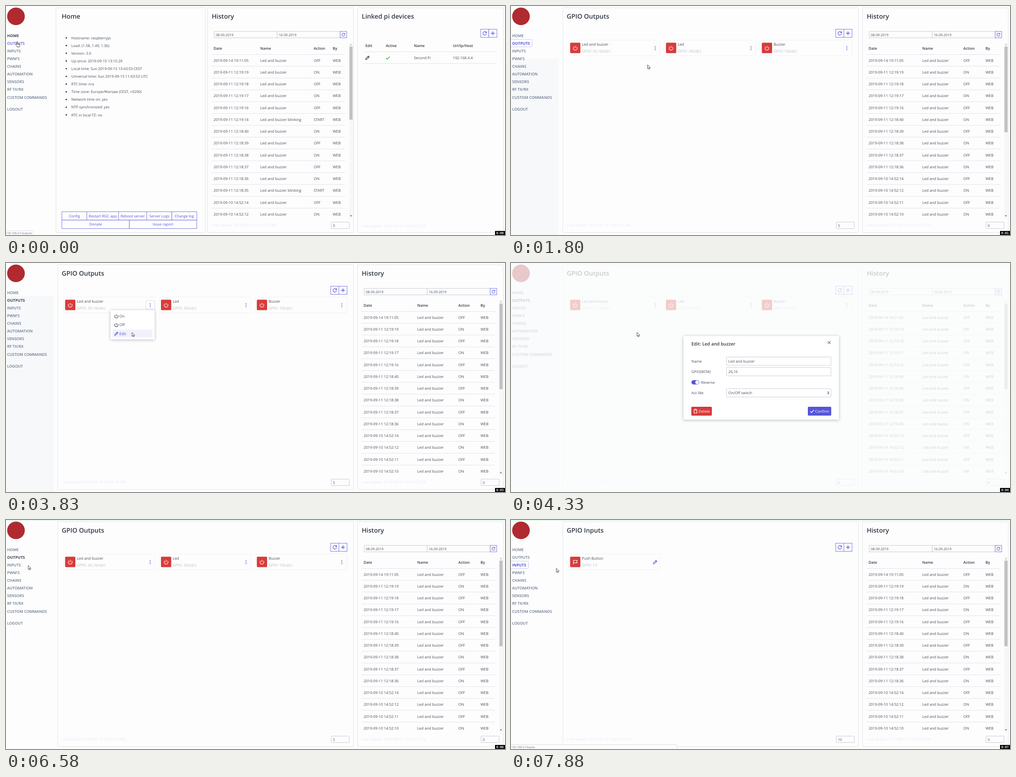
An HTML page for the animation above (8 s loop, 1101x508 px).

```html
<!DOCTYPE html>
<html lang="en">
<head>
<meta charset="utf-8">
<title>GPIO panel</title>
<style>
  html, body { margin: 0; width: 100%; height: 100%; overflow: hidden; background: #fdfdfd; }
  svg { display: block; width: 1101px; height: 508px; font-family: "Open Sans", "Noto Sans", sans-serif; text-rendering: geometricPrecision; }
  text { white-space: pre; }
</style>
</head>
<body>
<svg id="stage" viewBox="0 0 1101 508"></svg>
<script>
const LOOP = 8000;
const INK = '#464d5b', DARK = '#303742', SLATE = '#66758c', BLUE = '#5755d9', RED = '#d93b3b';
const LINE = '#e1e3e9', FIELD = '#c6cbd4', EDGE = '#7977e0', PALE = '#e7e7f8';

// Each step overrides only what changes from the one before it.
const STEPS = [
  { t: 0, page: 'home', active: 0, hover: 1, focus: 0, hand: 1, x: 25, y: 79, sec: 0, link: 'outputs', bar: 61 },
  { t: 770, page: 'outputs', loaded: 0, active: 1, hover: -1, focus: 1, sec: 1, bar: 367, stamp: '10.268', histStamp: '10.314' },
  { t: 1020, loaded: 1 },
  { t: 1520, hand: 0, x: 150, y: 120, bar: 0, side: [118, 508] },
  { t: 1800, x: 301.5, y: 130.5 },
  { t: 1900, x: 315, y: 106, sec: 2 },
  { t: 2150, hand: 1, x: 318, y: 91 },
  { t: 2680, menu: 1, item: -1, focus: 0, side: [73, 508] },
  { t: 3060, hand: 0, x: 285, y: 130, item: 1, sec: 3 },
  { t: 3310, x: 280, y: 151, item: 2 },
  { t: 3560, x: 278, y: 154 },
  { t: 4080, menu: 0, modal: 1, sec: 4, side: [0, 508] },
  { t: 4860, x: 640, y: 200, side: [0, 215] },
  { t: 5130, hand: 1, x: 704, y: 180, sec: 5 },
  { t: 5480, x: 706, y: 177 },
  { t: 5730, modal: 0, side: null, stamp: '15.084' },
  { t: 5980, hand: 0, x: 560, y: 150, sec: 6 },
  { t: 6230, x: 330, y: 122, green: 1 },
  { t: 6480, x: 140, y: 108 },
  { t: 6580, x: 49, y: 101 },
  { t: 6830, hand: 1, x: 25, y: 97, hover: 2, link: 'inputs', bar: 61 },
  { t: 7080, sec: 7 },
  { t: 7360, page: 'inputs', loaded: 0, active: 2, hover: -1, focus: 1, bar: 367, stamp: '16.514', histStamp: '16.505' },
  { t: 7630, loaded: 1 },
  { t: 7880, hand: 0, x: 100, y: 107 }
];
STEPS.forEach((s, i) => { STEPS[i] = { ...STEPS[i - 1], ...s }; });

const NAV = ['HOME', 'OUTPUTS', 'INPUTS', "PWM'S", 'CHAINS', 'AUTOMATION', 'SENSORS', 'RF TX/RX', 'CUSTOM COMMANDS', 'LOGOUT'];
const INFO = ['Hostname: raspberrypi', 'Load: (1.58, 1.49, 1.36)', 'Version: 3.0', 'Up since: 2019-09-15 13:15:29',
  'Local time: Sun 2019-09-15 13:43:53 CEST', 'Universal time: Sun 2019-09-15 11:43:53 UTC', 'RTC time: n/a',
  'Time zone: Europe/Warsaw (CEST, +0200)', 'Network time on: yes', 'NTP synchronized: yes', 'RTC in local TZ: no'];
const LOG = ['14 19:11:05 OFF', '11 12:19:19 ON', '11 12:19:18 OFF', '11 12:19:17 ON', '11 12:19:16 OFF', '11 12:19:14 START',
  '11 12:18:40 ON', '11 12:18:39 OFF', '11 12:18:38 ON', '11 12:18:37 OFF', '11 12:18:36 ON', '11 12:18:35 START',
  '10 14:52:14 OFF', '10 14:52:12 ON', '10 14:52:11 OFF', '10 14:52:10 ON'].map(r => r.split(' '));

const ICONS = {
  reload: 'M3.2 -2.4A4 4 0 1 0 3.9 1.2M3.9 -4.2V-1.2H.9',
  plus: 'M-4.2 0H4.2M0 -4.2V4.2',
  power: 'M-2.8 -3.2A4.3 4.3 0 1 0 2.8 -3.2M0 -5V0',
  pencil: 'M-4 4L-3.3 1.4 2 -3.9 3.9 -2 -1.4 3.3ZM.8 -2.7L2.7 -.8',
  check: 'M-4 .2L-1.3 3 4 -2.8',
  flag: 'M-4 5V-4H4.5L3.2 -1.3 4.5 1.4H-4',
  trash: 'M-4 -2.8H4M-1.5 -3V-4.4H1.5V-3M-3 -2.8V4.2H3V-2.8',
  cross: 'M-3 -3L3 3M3 -3L-3 3'
};

// y is the optical middle of the line of text
const text = (x, y, str, fill = INK, size = 8.2, weight = 400, extra = '') =>
  `<text x="${x}" y="${(y + size * .36).toFixed(2)}" fill="${fill}" font-size="${size}" font-weight="${weight}" ${extra}>${str}</text>`;
const mid = (x, y, str, fill, size, weight) => text(x, y, str, fill, size, weight, 'text-anchor="middle"');
const rect = (x, y, w, h, fill = 'none', stroke = 'none', r = 0) =>
  `<rect x="${x}" y="${y}" width="${w}" height="${h}" fill="${fill}" stroke="${stroke}" rx="${r}"/>`;
const path = (d, stroke, width = 1, fill = 'none') => `<path d="${d}" stroke="${stroke}" stroke-width="${width}" fill="${fill}"/>`;
const rule = (x1, x2, y, stroke = LINE) => path(`M${x1} ${y}H${x2}`, stroke);
const at = (x, y, inner, k = 1) => `<g transform="translate(${x} ${y}) scale(${k})">${inner}</g>`;
const icon = (name, x, y, color, k = 1, width = 1.2) => at(x, y, path(ICONS[name], color, width), k);
const title = (x, str) => text(x, 22.7, str, DARK, 14.1, 600);
const panel = (x, w) => rect(x, 4, w, 498.7, '#fdfdfd', LINE, 1);
const button = (x, y, w, h) => rect(x, y, w, h, '#fdfdfd', EDGE);
const dots = (x, y) => [-3.6, 0, 3.6].map(d => `<circle cx="${x}" cy="${y + d}" r="1" fill="${BLUE}"/>`).join('');

const update = (x, stamp, y = 486) => text(x, y, 'Last update: ' + stamp, PALE, 8.1);
const counter = (x, n) => rect(x, 479.3, 40, 14.4, '#fdfdfd', FIELD, 1) + text(x + 4, 486.8, n, INK, 7.6);
const tools = (x, y) => button(x, y, 18, 18) + button(x + 18, y, 18, 18) +
  icon('reload', x + 9, y + 9, BLUE) + icon('plus', x + 27, y + 9, BLUE, 1, 1.4);

function range(x) {
  return rect(x + .3, 56.3, 139, 14.4, '#fdfdfd', FIELD) + rect(x + 139.3, 56.3, 139, 14.4, '#fdfdfd', FIELD) +
    text(x + 4, 63.8, '08.09.2019', INK, 7.6) + text(x + 143, 63.8, '16.09.2019', INK, 7.6) +
    button(x + 278.3, 56.3, 14.4, 14.4) + icon('reload', x + 285.5, 63.5, BLUE, .85);
}

function log(x, cols, rows, thumb) {
  const cells = (y, vals, fill, weight) => vals.map((v, i) => text(x + cols[i], y, v, fill, 8.2, weight)).join('');
  const bar = x + 304;
  let out = cells(94.2, ['Date', 'Name', 'Action', 'By'], DARK, 600) + rule(x - .5, x + 294.5, 107.5);
  rows.forEach(([day, time, act], i) => {
    const y = 120.8 + 26.23 * i;
    out += cells(y, [`2019-09-${day} ${time}`, 'Led and buzzer' + (act === 'START' ? ' blinking' : ''), act, 'WEB'], INK, 400);
    if (i < rows.length - 1) out += rule(x - .5, x + 294.5, (y + 12.8).toFixed(2));
  });
  return out + rect(bar - 1, 82, 8.5, 389, '#f7f7f8') + rect(bar - .3, 90, 7, thumb, '#c1c1c3') +
    path(`M${bar + 1} 87h4l-2 -2.5z`, 'none', 0, '#a5a5a8') + path(`M${bar + 1} 464.5h4l-2 2.5z`, 'none', 0, '#404040');
}

function home() {
  let out = panel(110.3, 329.5) + title(123, 'Home');
  INFO.forEach((s, i) => {
    const y = 70.6 + 17.1 * i;
    out += `<circle cx="133" cy="${y}" r="1.6" fill="${DARK}"/>` + text(144, y, s, INK, 8.1);
  });
  const row = (y, xs, names) => names.map((n, i) =>
    button(xs[i], y, xs[i + 1] - xs[i], 18.7) + mid((xs[i] + xs[i + 1]) / 2, y + 9.4, n, BLUE)).join('');
  out += row(456.3, [123.3, 178.5, 248.5, 310.5, 366, 421], ['Config', 'Restart RGC app', 'Reboot server', 'Server Logs', 'Change log']);
  out += row(475, [123.3, 272.2, 421], ['Donate', 'Issue raport']);
  out += panel(444.7, 322) + title(454, 'History') + range(459) +
    log(454, [4, 107, 225, 267], LOG.slice(0, 14), 162) + update(454, '2019-09-15 13:43:52.198') + counter(717.5, 0);
  out += panel(775.7, 321.5) + title(785, 'Linked pi devices') + tools(1047.2, 51.5);
  ['Edit', 'Active', 'Name', 'Url/Ip/Host'].forEach((s, i) => { out += text([793, 838, 900, 986][i], 87.7, s, DARK, 8.2, 600); });
  return out + rule(789, 1083, 101.5) + rule(789, 1083, 127.5) + icon('pencil', 797.5, 115, DARK) +
    icon('check', 842.5, 115, '#32b643', 1, 1.5) + text(900, 114.6, 'Second Pi') + text(986, 114.6, '192.168.4.4') +
    update(785, '2019-09-15 13:43:52.294', 488);
}

const card = (x, name, pins, glyph, tail) => rect(x + .5, 75.5, 202, 35, '#fdfdfd', '#f0f1f5', 2) +
  rect(x + 4, 82, 21.5, 22, RED, '#c93030', 1) + icon(glyph, x + 14.7, 93.5, '#fff', 1, 1.1) +
  text(x + 29.5, 84.7, name) + text(x + 29.5, 100, 'GPIO: ' + pins, '#b9bdc8') + tail;

function gpio(s) {
  const out = s.page === 'outputs', when = v => s.loaded ? '2019-09-15 13:44:' + v : '';
  let body = panel(114.3, 652.4) + title(123, out ? 'GPIO Outputs' : 'GPIO Inputs') + tools(716.5, 51.5) +
    update(123, when(s.stamp)) + counter(717.5, out ? 5 : 10) +
    panel(775.7, 321.5) + title(785, 'History') + range(790) + update(785, when(s.histStamp)) + counter(1048, 0);
  if (!s.loaded) {
    return body + icon('cross', 936, 132.3, SLATE, 4.1, .3) +
      mid(936.3, 166.7, 'There are is no data in the selected range', SLATE, 10.05, 600);
  }
  const list = LOG.filter(r => r[2] !== 'START');
  body += log(785, [4, 122.5, 213, 262], list, 190);
  if (!out) return body + card(127, 'Push Button', '13', 'flag', icon('pencil', 318, 93.5, BLUE));
  [['Led and buzzer', '26,16(o)(r)'], ['Led', '26(o)(r)'], ['Buzzer', '16(o)(r)']].forEach(([n, p], i) => {
    const x = 127 + 211.5 * i;
    const focus = s.menu && !i ? rect(308.5, 83.5, 19, 19, '#fff', '#d5d7ee', 1) : '';
    body += card(x, n, p, 'power', focus + dots(x + 191, 93.5));
  });
  return body;
}

function nav(s) {
  let out = s.side ? rect(0, s.side[0], 105.5, s.side[1] - s.side[0], '#f7f8fa') : '';
  out += `<circle cx="22" cy="23" r="19.5" fill="#b02a30"/>`;
  NAV.forEach((name, i) => {
    const y = i < 9 ? 65.5 + 17.13 * i : 228.8;
    const on = i === s.active, lit = i === s.hover || on && s.focus;
    if (on && s.focus) out += rect(-1, y - 8.5, i === 1 ? 47.5 : 39.5, 16.5, '#fdfdfd', '#c9c9f2', 1);
    out += text(2.5, y, name, lit ? BLUE : on ? '#3b4351' : SLATE, 8.45, on ? 700 : 600);
  });
  return out;
}

const shadow = (x, y, w, h) =>
  `<rect x="${x}" y="${y}" width="${w}" height="${h}" fill="#fff" rx="1" style="filter:drop-shadow(0 1.5px 3px rgba(48,55,66,.35))"/>`;

function menu(s) {
  return shadow(230.5, 104.5, 97.5, 65) + ['On', 'Off', 'Edit'].map((name, i) => {
    const y = 118 + 19.3 * i, color = s.item === i ? BLUE : INK;
    return (s.item === i ? rect(235, y - 8.6, 88, 17, '#f1f1fc', 'none', 1) : '') +
      icon(i < 2 ? 'power' : 'pencil', 243.5, y + .2, color, .9, 1.3) + text(250, y, name, color, 8.4);
  }).join('');
}

function modal() {
  const field = (y, label, value) => text(398, y, label) + rect(475.5, y - 9.5, 230.5, 18.5, '#fff', FIELD, 1) + text(479.5, y, value);
  return rect(0, 0, 1101, 508, 'rgba(251,252,252,.75)') + shadow(380.5, 162, 343, 185.5) +
    text(398, 179, 'Edit: Led and buzzer', DARK, 10, 600) + icon('cross', 702, 176.5, '#6b7280') +
    field(218, 'Name', 'Led and buzzer') + field(241.3, 'GPIO(BCM)', '26,16') + field(288.3, 'Act like', 'On/Off switch') +
    path('M698 287.4h4l-2 -2.6zM698 289h4l-2 2.6z', 'none', 0, INK) +
    rect(398, 260, 17.5, 9.5, BLUE, 'none', 4.75) + '<circle cx="410.6" cy="264.75" r="3.9" fill="#fff"/>' + text(419.5, 264.8, 'Reverse') +
    rect(398.5, 319.5, 44, 18.5, RED, '#c32525', 1) + icon('trash', 407, 328.8, '#fff') + text(414, 329, 'Delete', '#fff') +
    rect(655.5, 319.5, 50.5, 18.5, BLUE, '#4b48d6', 1) + icon('check', 664.5, 328.8, '#fff', 1, 1.4) + text(671, 329, 'Confirm', '#fff');
}

const ARROW = path('M0 0V8.6L2 6.8 3.3 9.8 4.7 9.2 3.4 6.3H6.1Z', '#222', .8, '#fff');
const HAND = path('M0 0C.9 0 1.1.6 1.1 1.3V4.4L4.7 5.2C5.5 5.4 5.7 6 5.6 6.8L5 10.3V11.8H-.5V10.6L-3.7 6.8C-4.3 5.9 -3.1 5 -2.2 5.8L-1.1 6.8V1.3C-1.1.6 -.8 0 0 0ZM1.1 4.4V6.6M2.6 4.8V6.7M4.1 5.2V6.9', '#222', .8, '#fff');

function scene(s) {
  return nav(s) + (s.page === 'home' ? home() : gpio(s)) +
    (s.menu ? menu(s) : '') + (s.modal ? modal() : '') +
    (s.green ? rect(0, 0, 1101, 1, '#c4f7dc') : '') +
    (s.bar ? rect(-.5, 498.5, s.bar, 10, '#fdfdfd', '#dcdce0', 1) + text(1, 503.7, '192.168.4.7/' + s.link, '#666c76', 6) : '') +
    rect(1079, 499, 22, 9, '#000') +
    mid(1090, 503.6, '0:0' + s.sec, '#fff', 6.8, 700).replace('<text', '<text font-family="DejaVu Sans Mono, monospace"') +
    at(s.x, s.y, s.hand ? HAND : ARROW);
}

const stage = document.getElementById('stage');
const start = performance.now();
let shown = -1;
function tick() {
  const t = Math.max(0, performance.now() - start) % LOOP;
  const now = STEPS.filter(s => s.t <= t).length - 1;
  if (now !== shown) stage.innerHTML = scene(STEPS[shown = now]);
  requestAnimationFrame(tick);
}
tick();
</script>
</body>
</html>
```
